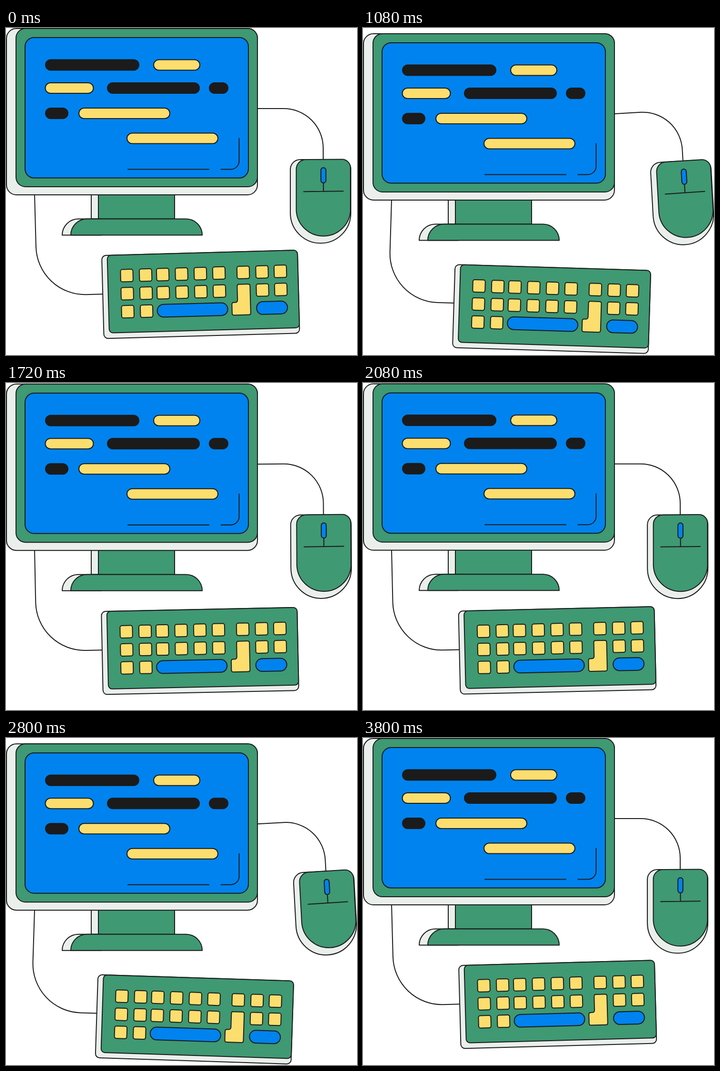
An HTML page with a canvas for the animation above (3840 ms loop, 737 by 686 pixels).

```html
<!DOCTYPE html>
<html lang="en">
<head>
<meta charset="utf-8">
<title>Desktop set</title>
<style>
html, body { margin: 0; width: 100%; height: 100%; overflow: hidden; background: #fff; }
canvas { display: block; }
</style>
</head>
<body>
<canvas id="stage" width="737" height="686"></canvas>
<script>
const ctx = document.getElementById('stage').getContext('2d');
const INK = '#1b1b1b', GREEN = '#3f9973', BLUE = '#0083ef', YELLOW = '#fbde6e', LIGHT = '#eaefec';
const CYCLE = 1920, STEP = 40;

function paint(path, fill) {
  if (fill) {
    ctx.fillStyle = fill;
    ctx.fill(path);
  }
  ctx.stroke(path);
}

// Rounded box given by its left, top, right and bottom edges.
function box(l, t, r, b, radius, fill) {
  const path = new Path2D();
  path.roundRect(l, t, r - l, b - t, radius);
  paint(path, fill);
}

const shape = (d, fill) => paint(new Path2D(d), fill);

// 0 at the start of a cycle, 1 in the middle, smoothly back to 0.
const swing = t => (1 - Math.cos(2 * Math.PI * t / CYCLE)) / 2;

function rotated(x, y, degrees, draw) {
  ctx.save();
  ctx.translate(x, y);
  ctx.rotate(degrees * Math.PI / 180);
  ctx.translate(-x, -y);
  draw();
  ctx.restore();
}

function drawMonitor() {
  box(179, 340, 200, 400.5, 0, LIGHT);
  box(194, 340, 354, 400.5, 0, GREEN);
  shape('M118 434.5A34 34 0 0 1 152 400.5H200V434.5Z', LIGHT);
  shape('M136 434.5A34 34 0 0 1 170 400.5H378A34 34 0 0 1 412 434.5Z', GREEN);
  box(1, 1, 528, 350, 21, LIGHT);
  box(21, 1, 528, 333, 20, GREEN);
  box(40, 20, 509, 314.5, 19, BLUE);

  const bars = [
    [83, 279, 66.5, INK], [310, 407, 66.5, YELLOW],
    [82.5, 183.5, 115, YELLOW], [213, 406, 115, INK], [427, 466, 115, INK],
    [83, 130, 168, INK], [153, 344, 168, YELLOW],
    [254, 445, 220.5, YELLOW]
  ];
  for (const [l, r, y, fill] of bars) box(l, y, r, y + 22, 11, fill);
  shape('M256 296.5H426M451.5 296.5H472A17.5 17.5 0 0 0 489.5 279V231.5');
}

function drawMouse() {
  shape('M528 169H583A83 83 0 0 1 666 252V276');
  shape('M597 297A21 21 0 0 1 618 276H704A20 20 0 0 1 724 296V388A63.5 63.5 0 0 1 597 388Z', LIGHT);
  shape('M609.5 296A20 20 0 0 1 629.5 276L705 275.5A18 18 0 0 1 723.3 293.5V383A57 57 0 0 1 609.5 383Z', GREEN);
  shape('M625 343.2L708 342.3M666.5 325V342.5');
  box(661.2, 293, 671.7, 325, 5.25, BLUE);
}

function drawKeyboard() {
  shape('M60 350V459A103 103 0 0 0 163 562H198');
  box(197.5, 481, 608.5, 655.3, 9, LIGHT);
  box(209, 481, 608.5, 643.8, 8, GREEN);

  const columns = [249, 288.5, 324.5, 364, 403.5, 442.5, 493.5, 533, 571.5];
  const key = (x, y) => box(x - 13, y - 13, x + 13, y + 13, 4, YELLOW);
  columns.forEach((x, i) => {
    key(x, 524.5);
    if (i !== 6) key(x, 562.5);
    if (i < 2) key(x, 600.3);
  });
  box(311, 587, 459, 613.7, 13.3, BLUE);
  box(519.5, 587, 584.5, 613.7, 13.3, BLUE);
  shape('M484 549.4H503Q507 549.4 507 553.4V609.7Q507 613.7 503 613.7H472Q468 613.7 468 609.7' +
    'V591Q468 587 472 587H475Q480 587 480 582V553.4Q480 549.4 484 549.4Z', YELLOW);
}

function render(time) {
  const t = Math.floor(time / STEP) * STEP % CYCLE;
  const s = swing(t);
  const mouseSwing = Math.pow(swing(t - 42), 1.22);

  ctx.fillStyle = '#fff';
  ctx.fillRect(0, 0, 737, 686);
  ctx.strokeStyle = INK;
  ctx.lineWidth = 2;
  ctx.lineCap = 'round';
  ctx.lineJoin = 'round';

  ctx.save();
  ctx.translate(0, 11.4 * s);
  rotated(528, 169, -3.3 * mouseSwing, drawMouse);
  rotated(60, 350, -1.55 + 3.45 * s, drawKeyboard);
  drawMonitor();
  ctx.restore();
}

const start = performance.now();
function loop() {
  render(performance.now() - start);
  requestAnimationFrame(loop);
}
loop();
</script>
</body>
</html>
```
